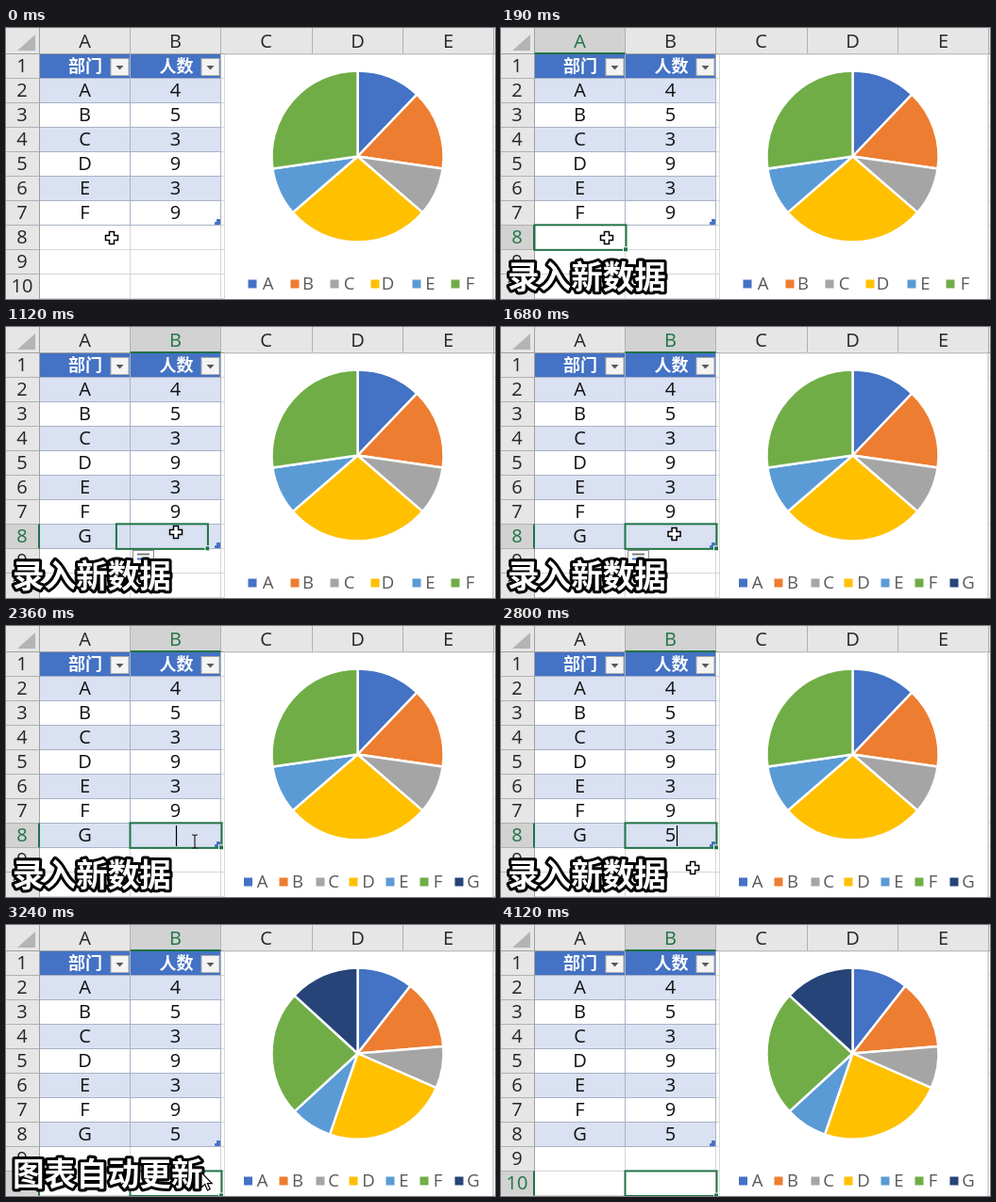
An HTML page for the animation above (4370 ms loop, 518 px wide and 288 px high).

```html
<!DOCTYPE html>
<html lang="zh">
<head>
<meta charset="utf-8">
<style>
html, body { margin: 0; width: 100%; height: 100%; overflow: hidden; background: #fff; }
svg { display: block; width: 518px; height: 288px; font: 20px "Open Sans", "Noto Sans", sans-serif; }
.cn { font-family: "Noto Sans CJK SC", "Noto Sans CJK", sans-serif; font-weight: 700; }
.cap { font-size: 33.6px; fill: #fff; stroke: #000; stroke-width: 6; stroke-linejoin: round; paint-order: stroke; }
</style>
</head>
<body>
<svg id="stage" viewBox="0 0 518 288"></svg>
<script>
const LOOP = 4370;
const GREEN = '#217346', BLUE = '#4472c4', EDGE = '#a9b2c6';
const NAMES = 'ABCDEFG';
const VALUES = [4, 5, 3, 9, 3, 9, 5];
const COLORS = [BLUE, '#ed7d31', '#a5a5a5', '#ffc000', '#5b9bd5', '#70ad47', '#264478'];
const LEGENDS = {
  6: { box: [261, 306, 348, 391, 435, 476], label: [277.5, 320, 363.5, 404.5, 449.5, 491.5] },
  7: { box: [256.5, 294, 333, 368, 407, 443, 480], label: [271.5, 309, 347, 384, 421.5, 457.5, 495] }
};
// time, x, y of the pointer
const PATH = [[480, 112, 223], [690, 156, 218], [890, 180, 218], [1620, 180, 218], [1930, 198, 228],
  [2360, 200, 229], [2560, 200, 229], [2870, 204, 265], [3115, 204, 265], [3240, 207, 263]];

const stage = document.getElementById('stage');
const colX = c => Math.round(35 + 96.2 * c) + 0.5;
const rowY = r => Math.floor(27 + 26.05 * (r - 1)) + 0.5;
const ramp = (t, a, b) => Math.min(1, Math.max(0, (t - a) / (b - a)));
const easeOut = p => 1 - (1 - p) ** 2;
const within = (t, a, b) => t >= a && t < b;

const rect = (x, y, w, h, fill, more = '') =>
  `<rect x="${x}" y="${y}" width="${w}" height="${h}" fill="${fill}" ${more}/>`;
const line = (x1, y1, x2, y2, color, w = 1) =>
  `<path d="M${x1} ${y1}L${x2} ${y2}" stroke="${color}" stroke-width="${w}"/>`;
const text = (s, x, y, fill = '#111', more = '') =>
  `<text x="${x}" y="${y}" fill="${fill}" text-anchor="middle" ${more}>${s}</text>`;

function headers(col, row) {
  let s = rect(0, 0, 518, 27, '#e6e6e6') + rect(0, 0, 35, 288, '#e6e6e6');
  s += '<path d="M31 7V24H12Z" fill="#b4b4b4"/>';
  for (let c = 0; c < 5; c++) {
    const x = colX(c), on = c === col;
    if (on) s += rect(x, 0, 96, 27, '#d2d2d2');
    s += line(x, 0, x, 27, '#b1b1b1') + text('ABCDE'[c], x + 48, 21, on ? GREEN : '#262626');
  }
  s += line(colX(5), 0, colX(5), 27, '#b1b1b1');
  for (let r = 1; r <= 10; r++) {
    const y = rowY(r), on = r === row;
    if (on) s += rect(0, y, 35, 26, '#d2d2d2');
    s += line(0, y, 35, y, '#b1b1b1') + text(r, 17, y + 19.5, on ? GREEN : '#262626');
  }
  s += line(0, 27.5, 518, 27.5, '#a0a0a0') + line(35.5, 0, 35.5, 288, '#a0a0a0');
  if (col >= 0) s += line(colX(col), 27, colX(col + 1), 27, GREEN, 2);
  if (row > 0) s += line(35, rowY(row), 35, rowY(row + 1), GREEN, 2);
  return s;
}

function grid() {
  let s = '';
  for (let r = 2; r <= 11; r++) s += line(35, rowY(r), 518, rowY(r), '#d6d6d6');
  for (let c = 1; c <= 5; c++) s += line(colX(c), 27, colX(c), 288, '#d6d6d6');
  return s;
}

function filterButton(x) {
  return rect(x - 9.5, 32.5, 19, 18, '#f4f4f4', 'stroke="#ababab"') +
    `<path d="M${x - 4} 40h8l-4 4.5z" fill="#595959"/>`;
}

function table(count, lastValue) {
  const [x0, x1, x2] = [0, 1, 2].map(colX), end = rowY(count + 2);
  let s = rect(x0, 27.5, x2 - x0, 26, BLUE);
  for (let i = 0; i < count; i++) {
    const y = rowY(i + 2);
    s += rect(x0, y, x2 - x0, 26, i % 2 ? '#fff' : '#d9e1f2') + line(x0, y, x2, y, EDGE);
    s += text(NAMES[i], 83.5, y + 19.5);
    if (i < 6 || lastValue) s += text(VALUES[i], 179.5, y + 19.5);
  }
  s += line(x0, end, x2, end, EDGE) + line(x1, 27, x1, end, EDGE) + line(x2, 27, x2, end, EDGE);
  s += text('部门', 84, 46.5, '#fff', 'class="cn" font-size="18"') + text('人数', 180.5, 46.5, '#fff', 'class="cn" font-size="18"');
  s += filterButton(120.5) + filterButton(216.5);
  return s + `<path d="M${x2 - 1} ${end - 6}v5h-5v-2h2v-3z" fill="${BLUE}" stroke="${BLUE}"/>`;
}

function pie(last) {
  const vals = VALUES.map((v, i) => i < 6 ? v : v * last);
  const sum = vals.reduce((a, b) => a + b);
  const cx = 372.5, cy = 136.5, R = 91;
  const at = a => `${cx + R * Math.sin(a)} ${cy - R * Math.cos(a)}`;
  let a = 0, s = '';
  vals.forEach((v, i) => {
    if (!v) return;
    const b = a + v / sum * 2 * Math.PI;
    s += `<path d="M${cx} ${cy}L${at(a)}A${R} ${R} 0 0 1 ${at(b)}Z" fill="${COLORS[i]}" stroke="#fff" stroke-width="2.4" stroke-linejoin="round"/>`;
    a = b;
  });
  return s;
}

function chart(count, last) {
  let s = rect(231.5, 28, 284, 262, '#fff', 'stroke="#d9d9d9"') + pie(last);
  const { box, label } = LEGENDS[count];
  box.forEach((x, i) => {
    s += rect(x - 4.5, 267.5, 9, 9, COLORS[i]) + text(NAMES[i], label[i], 278, '#595959', 'font-size="18.5"');
  });
  return s;
}

function selection(t) {
  if (t < 120) return '';
  const c = easeOut(ramp(t, 1060, 1160)), r = 8 + 2 * easeOut(ramp(t, 3115, 3220));
  const x = colX(0) + 96 * c, y = 27.5 + 26.05 * (r - 1) - 0.5;
  const editing = within(t, 480, 1060);
  let s = rect(x, y, 97, 26.5, editing ? '#fff' : 'none', `stroke="${GREEN}" stroke-width="2"`);
  if (!editing) s += rect(x + 94, y + 23.5, 5, 5, GREEN, 'stroke="#fff"');
  if (editing) s += `<text x="38" y="229" fill="#111">G</text>` + line(53, 212, 53, 234, '#000', 1.2);
  if (within(t, 2360, 2870)) {
    const cx = t < 2480 ? 180.5 : 186.5;
    s += line(cx, 212, cx, 234, '#000', 1.2);
  }
  return s;
}

function optionsButton() {
  return rect(134.5, 237.5, 22, 14, '#fff', 'stroke="#8c8c8c"') +
    line(139, 241.5, 152, 241.5, '#7a7a7a', 2) + line(139, 246.5, 152, 246.5, BLUE, 2);
}

function pointerAt(t) {
  let i = 1;
  while (i < PATH.length - 1 && t > PATH[i][0]) i++;
  const [a, x, y] = PATH[i - 1], [b, u, v] = PATH[i], p = ramp(t, a, b);
  return [x + (u - x) * p, y + (v - y) * p];
}

function pointer(t) {
  if (t >= 4000) return '';
  const [x, y] = pointerAt(t);
  let s = `<g transform="translate(${x} ${y})">`;
  if (within(t, 60, 125) || within(t, 1060, 1115) || within(t, 3000, 3115))
    s += '<circle r="14" fill="#ffe93b" fill-opacity=".85"/>';
  if (t >= 3200)
    s += '<path d="M0 0V16L3.7 12.6L6.5 19L9.2 17.8L6.4 11.6H11.2Z" fill="#fff" stroke="#000" stroke-width="1.2"/>';
  else if (within(t, 2360, 2870) && y < 237)
    s += '<path d="M-3-7H-1L0-6L1-7H3M0-6V6M-3 7H-1L0 6L1 7H3" fill="none" stroke="#222" stroke-width="1.2"/>';
  else
    s += '<path d="M-2.5-6.5h5v4h4v5h-4v4h-5v-4h-4v-5h4z" fill="#fff" stroke="#000" stroke-width="1.5"/>';
  return s + '</g>';
}

function caption(t) {
  const first = ramp(t, 60, 190) * (1 - ramp(t, 2900, 3050));
  const second = ramp(t, 3070, 3235) * (1 - ramp(t, 3950, 4115));
  const draw = (s, o) => o > 0 ? `<text class="cn cap" x="7" y="276.5" opacity="${o}">${s}</text>` : '';
  return draw('录入新数据', first) + draw('图表自动更新', second);
}

function render(t) {
  const grown = t >= 1060;
  const col = t < 120 ? -1 : grown ? 1 : 0;
  const row = t < 120 ? 0 : t < 3115 ? 8 : 10;
  stage.innerHTML = rect(0, 0, 518, 288, '#fff') + grid() + table(grown ? 7 : 6, t >= 2480) +
    headers(col, row) + chart(t < 1180 ? 6 : 7, easeOut(ramp(t, 3100, 3235))) +
    selection(t) + (within(t, 1060, 2360) ? optionsButton() : '') +
    (t < 3200 ? caption(t) + pointer(t) : caption(t) + pointer(t));
}

const start = performance.now();
function tick() {
  render((performance.now() - start) % LOOP);
  requestAnimationFrame(tick);
}
tick();
</script>
</body>
</html>
```
